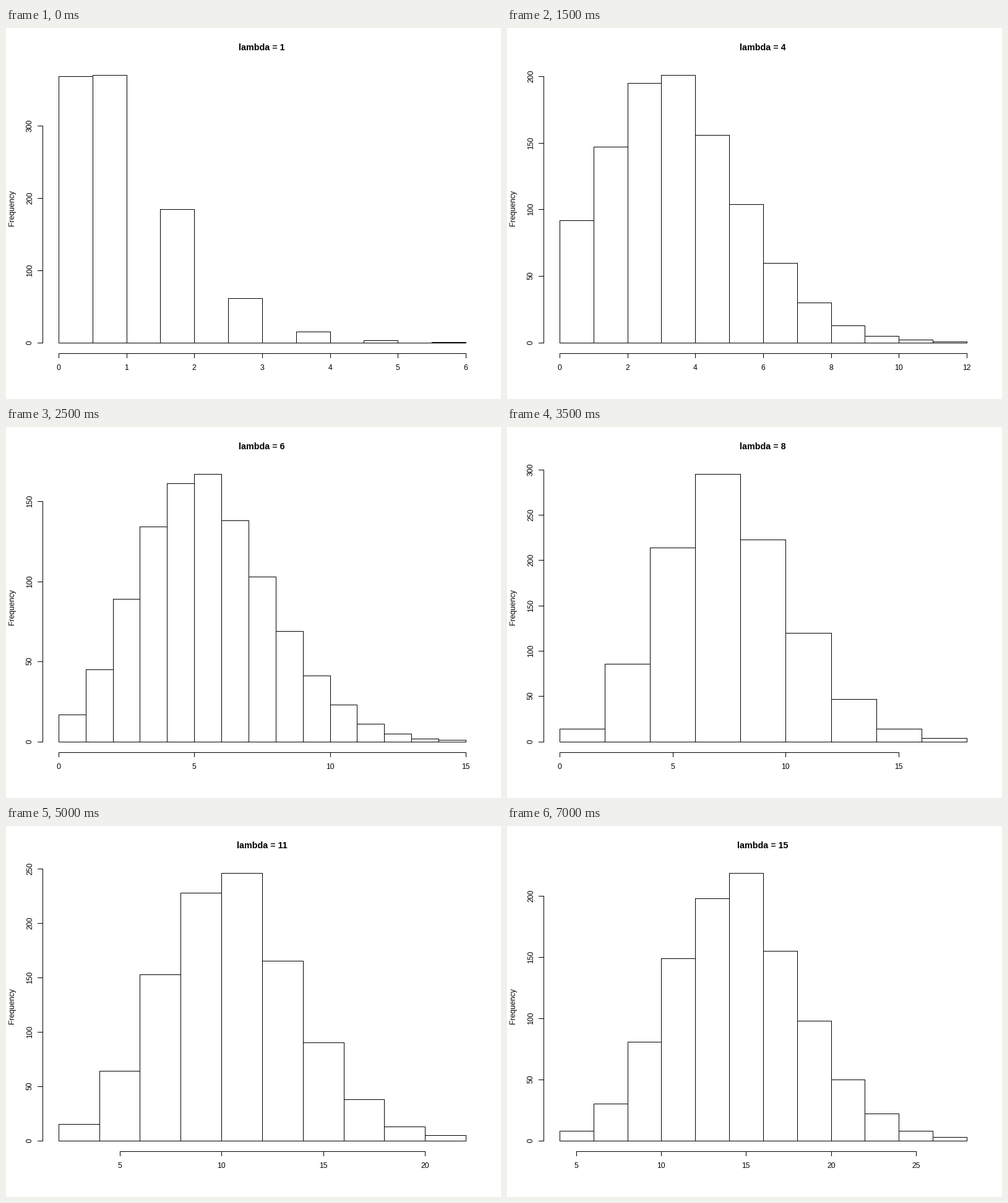
Animation, 800 px wide and 600 px high, one loop 7500 ms. Source, as a matplotlib script:

```python
import math

import matplotlib.pyplot as plt
from matplotlib.animation import FuncAnimation
from matplotlib.collections import LineCollection

W, H, DPI = 800, 600, 100
LEFT, RIGHT, TOP, BOTTOM = 59.04, 769.76, 59.04, 526.56
PAD = 0.04
TICK = 7.2
SAMPLES = 1000


def pretty_unit(span, n, bias, bias5):
    """Round step of 1, 2 or 5 times a power of ten, about n per span."""
    cell = span / n
    base = 10.0 ** math.floor(math.log10(cell))
    unit = base
    for factor, b in ((2, bias), (5, bias5), (10, bias)):
        if factor * base - cell >= b * (cell - unit):
            break
        unit = factor * base
    return unit


def pretty_ticks(lo, hi):
    pad = PAD * (hi - lo)
    lo, hi = lo - pad, hi + pad
    unit = pretty_unit(hi - lo, 5, 0.8, 1.7)
    return [round(i * unit)
            for i in range(math.ceil(lo / unit), math.floor(hi / unit) + 1)]


def poisson_cdf(k, lam):
    return sum(math.exp(-lam) * lam ** i / math.factorial(i)
               for i in range(math.floor(k) + 1))


def histogram(lam):
    """Break points and counts of a typical Poisson sample."""
    lo = max(0, 2 * (lam // 5 - 1))
    largest = math.floor(lam + 2.45 * math.sqrt(lam) + 3.53)
    step = pretty_unit(largest - lo, 11, 1.5, 2.75)
    n = math.ceil((largest - lo) / step)
    breaks = [lo + step * i for i in range(n + 1)]

    cdf = [0] + [poisson_cdf(b, lam) for b in breaks[1:-1]] + [1]
    shares = [b - a for a, b in zip(cdf, cdf[1:])]
    # The bin holding the mean rises above its expected share.
    shares[math.ceil((lam - lo) / step) - 1] *= 1 + 0.007 * lam
    return breaks, [round(SAMPLES * s) for s in shares]


def scale(lo, hi, start, end):
    """Map lo..hi to whole pixels, leaving the padding at both ends."""
    margin = (end - start) * PAD / (1 + 2 * PAD)
    a, b = start + margin, end - margin
    return lambda v: math.floor(a + (b - a) * (v - lo) / (hi - lo))


fig = plt.figure(figsize=(W / DPI, H / DPI), dpi=DPI, facecolor="white")
ax = fig.add_axes([0, 0, 1, 1])


def label(x, y, text, px=12.3, **kw):
    ax.text(x, y, text, fontsize=px * 72 / DPI, family="Liberation Sans",
            color="black", ha="center", va="baseline",
            rotation_mode="anchor", **kw)


def draw(frame):
    lam = frame + 1
    breaks, counts = histogram(lam)
    lo, hi, peak = breaks[0], breaks[-1], max(counts)
    sx, sy = scale(lo, hi, LEFT, RIGHT), scale(0, peak, BOTTOM, TOP)

    ax.clear()
    ax.set(xlim=(0, W), ylim=(H, 0))
    ax.axis("off")
    lines = []

    # Whole coordinates snap to the centre of their pixel.
    def line(*points):
        lines.append([(int(x), int(y)) for x, y in points])

    base = sy(0)
    for left, right, count in zip(breaks, breaks[1:], counts):
        x0, x1, y = sx(left), sx(right), sy(count)
        line((x0, base), (x0, y))
        line((x1, base), (x1, y))
        line((x0, y), (x1, y))
        line((x0, base), (x1, base))

    xs, ys = pretty_ticks(lo, hi), pretty_ticks(0, peak)
    line((sx(xs[0]), BOTTOM), (sx(xs[-1]), BOTTOM))
    for v in xs:
        line((sx(v), BOTTOM), (sx(v), BOTTOM + TICK))
        label(sx(v), 553, str(v))
    line((LEFT, sy(ys[0])), (LEFT, sy(ys[-1])))
    for v in ys:
        line((LEFT, sy(v)), (LEFT - TICK, sy(v)))
        label(42, sy(v) - 0.5, str(v), rotation=90)

    ax.add_collection(LineCollection(lines, colors="black",
                                     linewidths=72 / DPI, antialiaseds=False,
                                     capstyle="projecting"))
    label(13, 291.5, "Frequency", rotation=90)
    label(413.5, 36, f"lambda = {lam}", px=14.2, weight="bold")
    return []


anim = FuncAnimation(fig, draw, frames=15, init_func=lambda: [], interval=500,
                     repeat=True, repeat_delay=0, blit=False)
plt.show()
```
